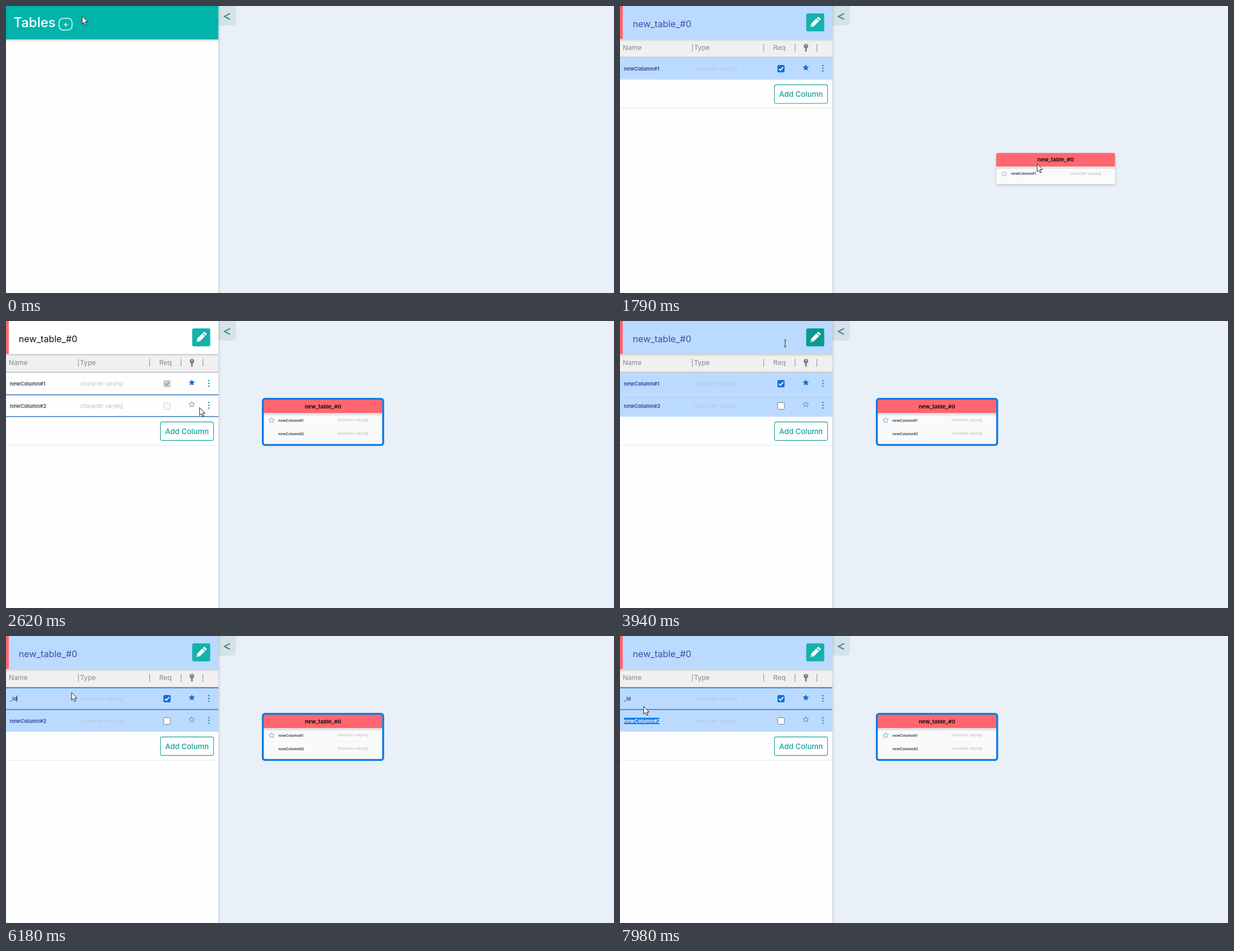
These frames come from a looping animation (1088 px wide and 515 px high, 8000 ms). An HTML page:

```html
<!DOCTYPE html>
<html lang="en">
<head>
<meta charset="utf-8">
<title>Table editor</title>
<style>
  html, body { margin: 0; width: 100%; height: 100%; overflow: hidden; background: #e9f0f7; }
  svg { display: block; width: 1088px; height: 515px; font-family: Inter, sans-serif; }
</style>
</head>
<body>
<svg viewBox="0 0 1088 515">
  <defs>
    <filter id="soft" x="-20%" y="-20%" width="140%" height="150%">
      <feDropShadow dx="0" dy="1.5" stdDeviation="2" flood-color="#000" flood-opacity=".24"/>
    </filter>
    <linearGradient id="down" x2="0" y2="1">
      <stop stop-color="#000" stop-opacity=".15"/><stop offset="1" stop-color="#000" stop-opacity="0"/>
    </linearGradient>
    <linearGradient id="side">
      <stop stop-color="#000" stop-opacity=".1"/><stop offset="1" stop-color="#000" stop-opacity="0"/>
    </linearGradient>
  </defs>
  <rect width="1088" height="515" fill="#e9f0f7"/>
  <g id="node"></g>
  <path d="M380 0H411.500V28Q411.500 35 404.500 35H380Z" fill="#d5e2e8"/>
  <path d="M401 13.600L391 18.800L401 24" fill="none" stroke="#4b8d90" stroke-width="2.300"/>
  <rect x="380" width="5" height="515" fill="url(#side)"/>
  <rect width="380" height="515" fill="#fefefe"/>
  <g id="panel"></g>
  <g id="cursor"></g>
</svg>
<script>
const LOOP = 8000;
const RED = '#ff666f', TEAL = '#14b2aa', BLUE = '#0a7ae4';
const layers = {}, last = {};
for (const id of ['node', 'panel', 'cursor']) layers[id] = document.getElementById(id);

// Event times in ms
const at = { create: 270, widen: 670, grab: 2020, drop: 2200, add: 2480, edit: 3730,
             pick1: 4930, type1: 5260, type2: 5520, type3: 5790, pick2: 7100 };

// Pointer path: time, x, y
const path = [
  [0, 136, 18], [200, 107, 33], [330, 112, 35], [540, 262, 85], [800, 288, 101],
  [1000, 300, 108], [1260, 413, 167], [1400, 413, 167], [1460, 504, 215], [1600, 504, 215],
  [1790, 746, 283], [1990, 746, 283], [2200, 534, 159], [2260, 534, 159],
  [2450, 325, 160], [2530, 326, 160], [2620, 346, 155], [2830, 346, 155], [3100, 335, 152],
  [3320, 338, 110], [3590, 349, 32], [3800, 349, 32], [3940, 296, 40], [4340, 118, 84],
  [4470, 112, 88], [4800, 52, 112], [5990, 52, 112], [6180, 117, 101],
  [6500, 108, 122], [6810, 64, 152], [7100, 42, 152], [7640, 42, 152], [7900, 42, 126], [8000, 42, 126]
];

function pointer(t) {
  const i = Math.max(1, path.findIndex(p => p[0] >= t));
  const [t0, x0, y0] = path[i - 1], [t1, x1, y1] = path[i];
  const k = (t - t0) / (t1 - t0);
  return [x0 + (x1 - x0) * k, y0 + (y1 - y0) * k];
}

const inside = ([px, py], x, y, w, h) => px >= x && px <= x + w && py >= y && py <= y + h;
const rect = (x, y, w, h, fill, extra = '') =>
  `<rect x="${x}" y="${y}" width="${w}" height="${h}" fill="${fill}" ${extra}/>`;
const text = (s, x, y, size, fill, weight = 400, anchor = 'start') =>
  `<text x="${x}" y="${y}" font-size="${size}" fill="${fill}" font-weight="${weight}" text-anchor="${anchor}">${s}</text>`;
const line = (x1, y1, x2, y2, color, w = 1) =>
  `<path d="M${x1} ${y1}L${x2} ${y2}" stroke="${color}" stroke-width="${w}"/>`;

function star(x, y, r, fill, stroke) {
  const pts = Array.from({ length: 10 }, (_, i) => {
    const a = i * Math.PI / 5, d = i % 2 ? r * .46 : r;
    return `${(x + d * Math.sin(a)).toFixed(2)},${(y - d * Math.cos(a)).toFixed(2)}`;
  });
  return `<polygon points="${pts.join(' ')}" fill="${fill}" stroke="${stroke}" stroke-width=".8" stroke-linejoin="round"/>`;
}

function drawNode(t) {
  if (t < at.create) return '';
  const wide = t >= at.widen, picked = t >= at.grab, rows = t >= at.add ? 2 : 1;
  const k = Math.min(1, Math.max(0, (t - 1990) / (at.drop - 1990)));
  const move = picked ? k : 0;
  const x = 673.3 - 212.3 * move, y = 263.7 - 122.7 * move;
  const w = wide ? 212.5 : 164, h = rows * 24 + 32;
  let s = rect(0, 0, w, h, '#fafafa', 'rx="3" filter="url(#soft)"');
  s += `<path d="M0 24.500V3Q0 0 3 0H${w - 3}Q${w} 0 ${w} 3V24.500Z" fill="${RED}"/>`;
  s += rect(0, 24.5, w, 4, '#dfe5e6');
  s += text('new_table_#0', w / 2, 15.6, 9.65, '#1c1013', 700, 'middle');
  for (let i = 0; i < rows; i++) {
    const cy = 37.2 + 24 * i;
    if (!i) s += star(14.3, cy, 5.2, 'none', !picked && wide ? '#a9b0b8' : '#4aa3e6');
    s += text('newColumn#' + (i + 1), 26.6, cy + 2.3, 6.45, '#40525c', 700);
    s += text('character varying', wide ? 132.3 : 84, cy + 2.2, 6.5, '#bcbfc2', 500);
    if (rows > 1) s += line(8, cy + 12, w - 8, cy + 12, '#f1f2f3');
  }
  if (picked) s += rect(-1.4, -1.4, w + 2.8, h + 2.8, 'none', `rx="4" stroke="${BLUE}" stroke-width="3.400"`);
  return `<g transform="translate(${x.toFixed(2)} ${y.toFixed(2)})">${s}</g>`;
}

function checkbox(cy, on, edit) {
  const x = 281.7, y = cy - 6.3;
  if (!on) return rect(x + .4, y + .4, 12, 12, edit ? '#fff' : '#f8f8f8', `rx="2" stroke="${edit ? '#777' : '#cfcfcf'}"`);
  return rect(x, y, 12.8, 12.8, edit ? '#0b70dc' : '#cecece', 'rx="2"') +
    `<path d="M${x + 2.7} ${y + 6.600}l2.700 2.700l5 -5.700" fill="none" stroke="${edit ? '#fff' : '#999'}" stroke-width="1.900"/>`;
}

function nameOf(i, t) {
  if (i || t < at.type1) return 'newColumn#' + (i + 1);
  return t < at.type2 ? '_' : t < at.type3 ? '_i' : '_id';
}

function drawRow(i, t, edit, hover) {
  const top = 93 + 39.5 * i, cy = 112.4 + 39.9 * i;
  const name = nameOf(i, t);
  const chosen = i ? t >= at.pick2 : t >= at.pick1 && t < at.type1;
  let s = rect(0, top, 380, 39, edit ? '#bbdaff' : '#fefefe');
  if (!hover) s += line(0, top + 39, 380, top + 39, edit ? '#d2e5fb' : '#e4e4e4');
  if (chosen) s += rect(7, cy - 5.6, 64, 11.4, '#0b7de6');
  s += text(name, 6.8, cy + 3.3, 9.2, chosen ? '#fff' : edit ? '#3b4fa3' : '#505b62', 700);
  if (!i && t >= at.type1 && t < 6650) {
    const end = t < at.type2 ? 12 : t < at.type3 ? 14.3 : 19.7;
    s += line(end, cy - 5.5, end, cy + 5.5, '#333');
  }
  s += text('character varying', 133, cy + 3.2, 9.2, edit ? '#b4c5d8' : '#bfbfbf');
  s += checkbox(cy, !i, edit);
  s += star(332.5, cy - 1.6 - i * .8, 5.2, i ? 'none' : '#176fd4', i ? '#4d749f' : '#176fd4');
  for (let d = -1; d < 2; d++) s += `<circle cx="363" cy="${cy - .5 - i * .6 + d * 5}" r="1.300" fill="#12a09c"/>`;
  return s;
}

function drawPanel(t, p) {
  if (t < at.create) {
    const over = inside(p, 95, 22, 24, 22);
    return rect(0, 60, 380, 5, 'url(#down)') + rect(0, 0, 380, 60, '#00b4ab') +
      text('Tables', 13.3, 38, 24, '#fff', 500) +
      rect(94.9, 22.2, 23.4, 21, over ? '#fff' : 'none', 'rx="7.500" stroke="#e9fffc" stroke-width="1.500"') +
      `<path d="M103.500 33.600h7M107 30.100v7" stroke="${over ? '#00b4ab' : '#fff'}" stroke-width="1.400"/>`;
  }
  const edit = t < at.grab || t >= at.edit;
  const rows = t >= at.add ? 2 : 1, shift = (rows - 1) * 39.7;
  const onPencil = inside(p, 333, 13, 33, 33) || (t >= at.edit && t < 4010);
  const onAdd = inside(p, 276, 141 + shift, 96, 34);

  let s = rect(0, 59, 380, 33, '#f0f0f0') + rect(0, 59, 380, 5, 'url(#down)');
  s += rect(0, 0, 380, 59, edit ? '#bbdaff' : '#fff') + rect(0, 0, 5, 59, RED);
  s += text('new_table_#0', 22.7, 37.5, 16.2, edit ? '#3a50a4' : '#111');
  s += rect(333.2, 13.2, 32.3, 32.3, onPencil ? '#079a92' : TEAL, 'rx="3"');
  s += `<g transform="translate(349 29.500) rotate(45)" fill="#fff">
    <path d="M-3.400 -10.500Q-3.400 -11.800 -2.100 -11.800H2.100Q3.400 -11.800 3.400 -10.500V-8H-3.400ZM-3.400 -6.700H3.400V6.200L0 12L-3.400 6.200Z"/>
    <path d="M-1.300 8L0 10.300L1.300 8Z" fill="${TEAL}"/></g>`;

  const gray = '#858990';
  s += text('Name', 5, 79.2, 12.2, gray) + text('Type', 132.2, 79.2, 12.2, gray) + text('Req', 274.3, 79.2, 12.2, gray);
  for (const x of [129.6, 257, 313.3, 352.4]) s += line(x, 68, x, 82, '#8f9297', 1.1);
  s += `<circle cx="332.700" cy="72" r="4" fill="#7c8188"/><path d="M331.200 75h3v6l-1.500 1.500l-1.500 -1.500z" fill="#7c8188"/>
    <circle cx="332.700" cy="70.500" r="1" fill="#f0f0f0"/>`;
  s += line(0, 92, 380, 92, '#b9bcc0', 1.4);

  let edges = '';
  for (let i = 0; i < rows; i++) {
    const top = 93 + 39.5 * i;
    const hover = inside(p, 0, top, 380, 39);
    s += drawRow(i, t, edit, hover);
    if (hover) for (const y of [top, top + 39]) edges += line(0, y, 380, y, '#2f73bd', 1.3);
  }
  s += edges;
  s += rect(276.4, 141.4 + shift, 95, 33.3, onAdd ? '#14a098' : '#fff', 'rx="3.500" stroke="#16a098" stroke-width="1.100"');
  s += text('Add Column', 323.9, 162.9 + shift, 13.33, onAdd ? '#fff' : '#16a098', 500, 'middle');
  return s + line(0, 183.3 + shift, 380, 183.3 + shift, '#e5e5e5');
}

const shapes = {
  arrow: '<path d="M.4 .4V14.200L3.500 11.300L5.700 16.300L8 15.300L5.800 10.500H10.200Z" fill="#fff" stroke="#222" stroke-width="1"/>',
  beam: '<path d="M-2.500 -6.500Q0 -6.500 0 -5V5Q0 6.500 -2.500 6.500M2.500 -6.500Q0 -6.500 0 -5V5Q0 6.500 2.500 6.500" fill="none" stroke="#333" stroke-width="1"/>',
  hand: '<path d="M-1.500 1Q0 -1 1.500 1V6Q3 5 4.500 6.500Q6 5.500 7.200 7.200Q9 6.500 9.500 8.500V12L8 17H0L-4.500 10.500Q-4.500 8.500 -1.500 10.500Z" fill="#fff" stroke="#222"/>'
};

function drawCursor(t, p) {
  const created = t >= at.create, edit = created && (t < at.grab || t >= at.edit);
  const shift = t >= at.add ? 39.7 : 0;
  const onButton = created
    ? inside(p, 333, 13, 33, 33) || inside(p, 276, 141 + shift, 96, 34)
    : inside(p, 95, 22, 24, 22);
  const onField = edit && (inside(p, 20, 18, 290, 27) || inside(p, 5, 105, 120, 15) ||
    (t >= at.add && inside(p, 5, 145, 120, 15)));
  const kind = onButton ? 'hand' : onField ? 'beam' : 'arrow';
  return `<g transform="translate(${p[0].toFixed(2)} ${p[1].toFixed(2)})">${shapes[kind]}</g>`;
}

function put(id, markup) {
  if (last[id] !== markup) layers[id].innerHTML = last[id] = markup;
}

function draw(t) {
  const p = pointer(t);
  put('node', drawNode(t));
  put('panel', drawPanel(t, p));
  put('cursor', drawCursor(t, p));
}

const start = performance.now();
function tick(now) {
  draw(Math.max(0, now - start) % LOOP);
  requestAnimationFrame(tick);
}
draw(0);
requestAnimationFrame(tick);
</script>
</body>
</html>
```
